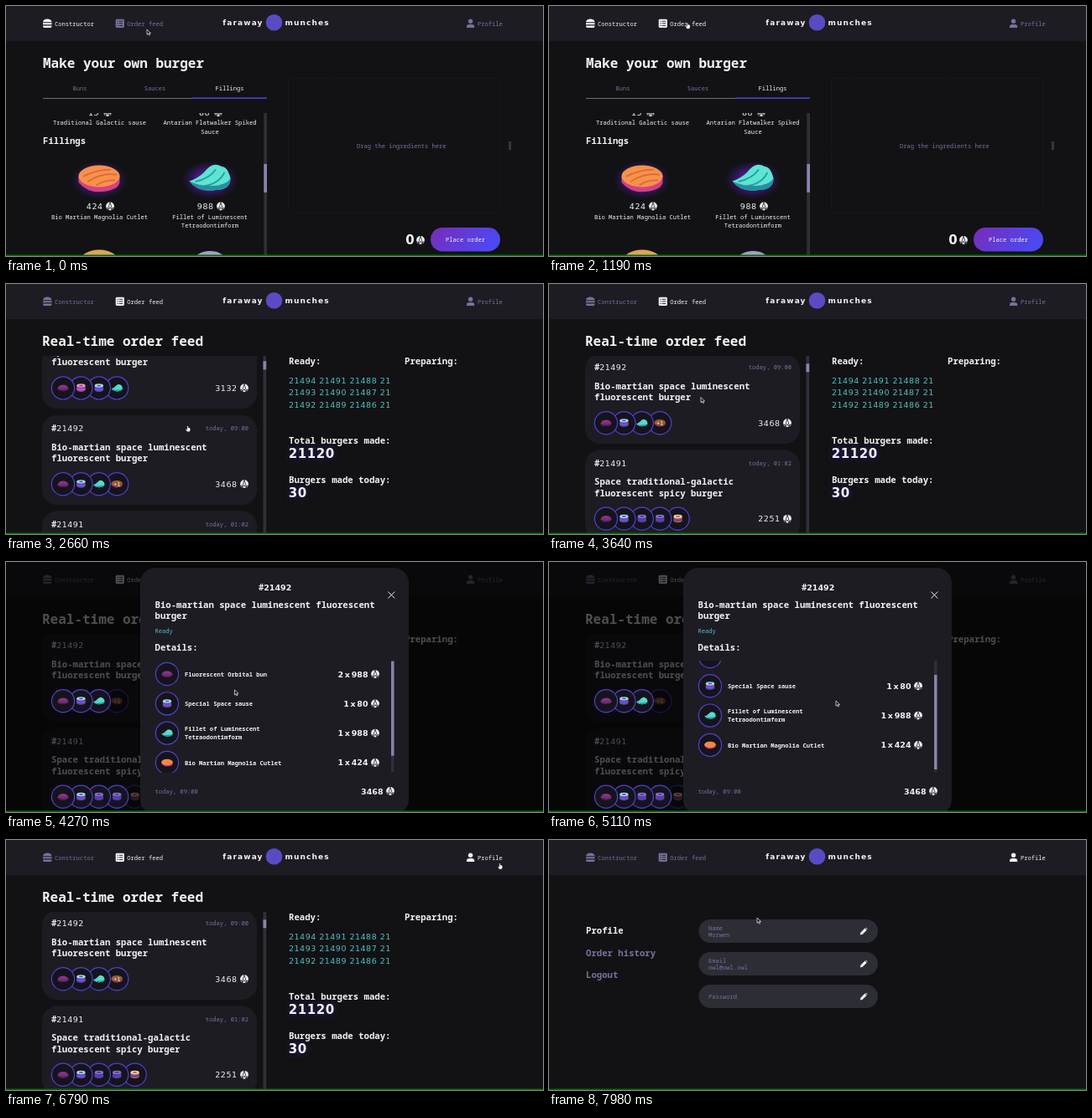
An HTML page that plays this animation: 640x299 px, repeating every 8000 ms.

```html
<!DOCTYPE html>
<html lang="en">
<head>
<meta charset="utf-8">
<title>Burger orders</title>
<style>
  html, body { margin: 0; width: 100%; height: 100%; overflow: hidden; background: #121214; }
  svg { display: block; width: 100vw; height: 100vh; }
  text { font-family: "Noto Sans Mono", "DejaVu Sans Mono", monospace; font-size: 7.11px; fill: #f2f2f3; white-space: pre; }
  .h1 { font-size: 16px; font-weight: bold; }
  .h2 { font-size: 10.67px; font-weight: bold; }
  .strong { font-weight: bold; }
  .num { font-family: "DejaVu Sans", Verdana, sans-serif; font-size: 9.5px; letter-spacing: .5px; }
  #modal .num { font-weight: bold; letter-spacing: 0; }
  .big { font-size: 15px; font-weight: bold; letter-spacing: .6px; }
  .brand { font-family: "DejaVu Sans", Verdana, sans-serif; font-size: 9px; font-weight: bold; letter-spacing: 1.1px; }
  .dim { fill: #74739a; }
  .cyan { fill: #4fc0c4; }
  .mid { text-anchor: middle; }
  .end { text-anchor: end; }
  .glow { filter: drop-shadow(0 0 4px #2a1a7a); }
</style>
</head>
<body>
<svg id="stage" viewBox="0 0 640 299" preserveAspectRatio="none"></svg>
<script>
const LOOP = 8000, STEP = 70;
const WHITE = '#f2f2f3', DIM = '#74739a', PANEL = '#1d1c23', BACK = '#121214';

const text = (x, y, s, cls = '') => `<text x="${x}" y="${y}" class="${cls}">${s}</text>`;
const rect = (x, y, w, h, fill, r = 0, more = '') =>
  `<rect x="${x}" y="${y}" width="${w}" height="${h}" rx="${r}" fill="${fill}" ${more}/>`;
const path = (d, fill, more = '') => `<path d="${d}" fill="${fill}" ${more}/>`;
const at = (x, y, s, scale = 1) => `<g transform="translate(${x} ${y}) scale(${scale})">${s}</g>`;
const clip = (id, x, y, w, h) => `<clipPath id="${id}">${rect(x, y, w, h, '#000')}</clipPath>`;
const lines = (x, y, gap, list, cls) => list.map((s, i) => text(x, y + i * gap, s, cls)).join('');
const orderNo = (x, y, n) => text(x, y, '#', 'h2') + text(x + 6.2, y, n, 'num');

const coin = (x, y) => at(x, y,
  `<circle r="4.9" fill="${WHITE}"/>` +
  path('M0-4.9L-2.8 4.4M0-4.9L2.8 4.4M-4.7 1.6L-2 3M4.7 1.6L2 3M-2.3 4.8L0 1.3L2.3 4.8', 'none',
    `stroke="${PANEL}" stroke-width=".8"`));

const price = (right, y, s) => text(right + .5, y + 3.5, s, 'num end') + coin(right + 9, y);

// Ingredients, drawn around their centre at thumbnail size.
function can(body, band, lid) {
  return path('M-5.4-3V3.2Q0 6.4 5.4 3.2V-3Z', body) + path('M-5.4-.2Q0 2.3 5.4-.2V2Q0 4.4-5.4 2Z', band) +
    `<ellipse cy="-3" rx="5.4" ry="2.3" fill="${lid}"/><ellipse cy="-3" rx="2.6" ry=".9" fill="${body}"/>`;
}
const foods = {
  bun: path('M-7 1Q-6-4 0-4Q6-4 7 1Q5 4 0 4Q-5 4-7 1Z', '#7d2c7c') +
    path('M-7 1Q0 4 7 1Q5 4 0 4Q-5 4-7 1Z', '#4b1c58') +
    path('M-4-1.5Q0-3.5 4-1.5', 'none', 'stroke="#a1489a" stroke-width=".8"'),
  blue: can('#5150b8', '#8c49c9', '#a9dbe8'),
  pink: can('#8d3bb3', '#d95aa5', '#e59ac2'),
  violet: can('#4a3a9c', '#6d3db5', '#8176c9'),
  cream: can('#a85f5b', '#6d3c9a', '#f2cfae'),
  fillet: path('M-7 1Q-4 0-2-2Q1-6 4-4Q6-4 7 0Q7 4 2 4Q-4 5-7 1Z', '#5fe3d3') +
    path('M-5 1.2Q0 0 2-3M-2 2.7Q3 2 5-2', 'none', 'stroke="#1f9d9c" stroke-width=".5"') +
    path('M-7 1Q-4 5 2 4Q7 4 7 0Q6 2 2 2.5Q-3 3-7 1Z', '#278f9d'),
  cutlet: path('M-7-.5V1.4Q-4 5 1 4.6Q7 4 7 1V-1Z', '#d63f86') +
    `<ellipse cy="-.7" rx="7" ry="3.7" fill="#f7914b"/>` +
    path('M-5.5-.6Q-1-3 4-3M-4 1.2Q1-2 6-1.2M-1 2.4Q2 .5 5.4.7', 'none', 'stroke="#d96a35" stroke-width=".5"')
};
const badge = (x, y, kind, extra) =>
  `<circle cx="${x}" cy="${y}" r="13.6" fill="#15141c" stroke="#5140d0" stroke-width="1.2"/>` +
  `<g opacity="${extra ? .6 : 1}">${at(x, y, foods[kind], .95)}</g>` +
  (extra ? text(x, y + 2.6, extra, 'mid') : '');

// The last badge of a row lies below the modal shade, the others above it.
function card(y, no, date, title, kinds, sum, extra) {
  const h = title.length > 1 ? 107 : 95, mid = y + h - 24.8, last = kinds.length - 1;
  const row = kinds.map((k, i) => badge(68 + 21.4 * i, mid, k, i === last && extra));
  return {
    base: rect(43, y, 256, h, PANEL, 18) + orderNo(54, y + 19, no) +
      text(289, y + 18.2, date, 'dim end') + lines(54, y + 41.7, 13.5, title, 'h2') +
      row[last] + price(275, mid, sum),
    lit: row.slice(0, last).reverse().join('')
  };
}

const cards = [
  card(86, 21494, 'today, 12:28', ['Space luminescent fluorescent burger'], ['bun', 'fillet', 'blue'], 3044),
  card(188.2, 21493, 'today, 12:26', ['Space antarian luminescent', 'fluorescent burger'],
    ['bun', 'pink', 'blue', 'fillet'], 3132),
  card(303, 21492, 'today, 09:00', ['Bio-martian space luminescent', 'fluorescent burger'],
    ['bun', 'blue', 'fillet', 'cutlet'], 3468, '+1'),
  card(417.6, 21491, 'today, 01:02', ['Space traditional-galactic', 'fluorescent spicy burger'],
    ['bun', 'blue', 'violet', 'violet', 'cream'], 2251)
];
const cardLayer = (id, part) =>
  `<g clip-path="url(#feedBox)"><g id="${id}">${cards.map(c => c[part]).join('')}</g></g>`;

const tab = (x, s, on) => text(x, 101, s, 'mid' + (on ? '' : ' dim'));
const glowSpot = (x, y) => `<ellipse cx="${x}" cy="${y}" rx="34" ry="23" fill="url(#aura)"/>`;

function buildConstructor() {
  const list =
    text(98, 131, '15', 'num') + coin(121, 127) + text(230, 131, '88', 'num') + coin(253, 127) +
    text(111.5, 142, 'Traditional Galactic sause', 'mid') +
    lines(243, 142, 10.6, ['Antarian Flatwalker Spiked', 'Sauce'], 'mid') +
    text(44, 165, 'Fillings', 'h2') +
    glowSpot(111, 208) + glowSpot(243, 208) +
    at(111, 206, foods.cutlet, 3.5) + at(243, 206, foods.fillet, 3.5) +
    price(115, 239.5, '424') + price(247, 239.5, '988') +
    text(111.5, 254.5, 'Bio Martian Magnolia Cutlet', 'mid') +
    lines(243, 254.5, 10.4, ['Fillet of Luminescent', 'Tetraodontimform'], 'mid') +
    `<ellipse cx="111" cy="304" rx="22" ry="12.5" fill="#dfa35c"/>` +
    `<ellipse cx="243" cy="305" rx="19" ry="12" fill="#a99bc4"/>`;
  return text(44, 74, 'Make your own burger', 'h1') +
    tab(88, 'Buns') + tab(177.5, 'Sauces') + tab(266.5, 'Fillings', true) +
    rect(44, 110, 178, .8, '#85848f') + rect(222, 109.5, 89, 1.4, '#4c4cf0') +
    `<g clip-path="url(#shelf)">${list}</g>` +
    rect(307.3, 128, 3.7, 170, '#2f2f37') + rect(307.3, 189, 3.7, 34, '#8585ad') +
    rect(336.5, 86.5, 252, 161, 'none', 3, 'stroke="#1b1b20" stroke-dasharray="2 1"') +
    text(471.3, 170, 'Drag the ingredients here', 'dim mid') +
    rect(599, 162, 3, 10, '#35353d') +
    text(476.2, 285, '0', 'num big') + coin(494, 280) +
    rect(506, 265, 83, 28.5, 'url(#button)', 14.2) + text(547.5, 282, 'Place order', 'mid');
}

function buildFeed() {
  const ready = [0, 1, 2].map(r => [94, 91, 88].map(n => 21400 + n - r).join(' ') + ' 21');
  return text(43, 74, 'Real-time order feed', 'h1') + cardLayer('cards', 'base') +
    rect(306.5, 86, 3.7, 212, '#2f2f37') + `<g id="feedThumb">${rect(306.5, 86.3, 3.7, 10, '#8585ad')}</g>` +
    text(337, 96.4, 'Ready:', 'h2') + text(475, 96.4, 'Preparing:', 'h2') +
    lines(337, 119.1, 14.2, ready, 'num cyan') +
    text(337, 191.2, 'Total burgers made:', 'h2') + text(336.7, 207.6, '21120', 'num big glow') +
    text(337, 238.2, 'Burgers made today:', 'h2') + text(336.7, 254.6, '30', 'num big glow');
}

function buildModal() {
  const rows = [
    ['bun', ['Fluorescent Orbital bun'], '2 x 988'],
    ['blue', ['Special Space sause'], '1 x 80'],
    ['fillet', ['Fillet of Luminescent', 'Tetraodontimform'], '1 x 988'],
    ['cutlet', ['Bio Martian Magnolia Cutlet'], '1 x 424']
  ].map(([kind, name, sum], i) => {
    const y = 135 + 35.3 * i;
    return badge(192, y, kind) + lines(213, y + (name.length > 1 ? -2.8 : 2.6), 10.5, name, 'strong') +
      `<g style="word-spacing:-1.6px">${price(431, y, sum)}</g>`;
  }).join('');
  return rect(160, 7, 320, 295, PANEL, 18) + orderNo(301, 34, 21492) +
    path('M455.3 35.5L463.3 43.5M463.3 35.5L455.3 43.5', 'none', `stroke="${WHITE}" stroke-width="1"`) +
    lines(177.5, 54.5, 13.4, ['Bio-martian space luminescent fluorescent', 'burger'], 'h2') +
    text(177.5, 84.5, 'Ready', 'cyan') + text(177.5, 106, 'Details:', 'h2') +
    `<g clip-path="url(#modalBox)"><g id="rows">${rows}</g></g>` +
    rect(459, 118, 3.5, 133, '#2f2f37') + `<g id="modalThumb">${rect(459, 118, 3.5, 113, '#8585ad')}</g>` +
    text(177.5, 276.5, 'today, 09:00', 'dim') + price(449, 274, '3468');
}

function buildProfile() {
  const pencil = path('M-4.2 4.2L-3.5 1.3L1.5-3.7L3.7-1.5L-1.3 3.5ZM2.2-4.3L3-4.5L4.5-3L4.3-2.2Z', WHITE);
  const field = (y, label, value) => rect(178.5, y, 213.5, 28, '#2c2d35', 14) + at(375, y + 14.3, pencil) +
    lines(190, y + (value ? 12.6 : 16.6), 8, value ? [label, value] : [label], 'dim');
  return text(44, 112, 'Profile', 'h2') + text(44, 138.5, 'Order history', 'h2 dim') +
    text(44, 165, 'Logout', 'h2 dim') +
    field(95, 'Name', 'Morwen') + field(134, 'Email', 'owl@owl.owl') + field(173, 'Password');
}

function buildHeader() {
  const shape = d => `<path d="${d}"/>`;
  const burger = shape('M44 19.2Q44.6 15.6 49.3 15.6Q54 15.6 54.6 19.2ZM44 20.3H54.6V22.3H44ZM44 23.4H54.6Q54.6 26 52 26H46.6Q44 26 44 23.4Z');
  const sheet = `<rect x="130.7" y="15.8" width="10.2" height="10.2" rx="1.4"/>` +
    path('M132.4 18.3h1.2m1 0h4.6M132.4 20.9h1.2m1 0h4.6M132.4 23.5h1.2m1 0h4.6', 'none', `stroke="${PANEL}" stroke-width=".9"`);
  const person = `<circle cx="553.6" cy="18.3" r="2.7"/>` + shape('M549 26V24.6Q549 22 552 22H555.2Q558.2 22 558.2 24.6V26Z');
  const link = (id, x, label, icon) =>
    `<g id="${id}">${icon}<text x="${x}" y="23.5" style="fill:inherit">${label}</text></g>`;
  return rect(0, 0, 640, 42, PANEL) +
    link('navMake', 58, 'Constructor', burger) + link('navFeed', 144.3, 'Order feed', sheet) +
    link('navUser', 562, 'Profile', person) +
    text(306.5, 22.8, 'faraway', 'brand end') + `<circle cx="319.5" cy="19.8" r="9.8" fill="#5a4bc4"/>` +
    text(332.5, 22.8, 'munches', 'brand');
}

const arrow = path('M0 0V8.3L2 6.5L3.3 9.4L4.7 8.8L3.4 6H6Z', '#111', 'stroke="#fff" stroke-width=".9"');
const hand = path('M-.9.5Q0-.6.9.5V3Q2 2.4 2.5 3.3Q4.3 3 4.3 4.5V6.5Q4 8.7 2.8 9.6H-.8Q-2 8.2-3.2 5.6Q-2.4 4.4-.9 5.9Z',
  '#fff', 'stroke="#111" stroke-width=".6"');

const stage = document.getElementById('stage');
stage.innerHTML = `<defs>
  ${clip('shelf', 40, 128, 266, 170)}${clip('feedBox', 43, 86, 257, 212)}${clip('modalBox', 170, 118, 285, 134)}
  <linearGradient id="button" x1="0" y1="0" x2="1" y2=".3"><stop stop-color="#7a2bb8"/><stop offset="1" stop-color="#4d48f2"/></linearGradient>
  <radialGradient id="aura"><stop offset=".4" stop-color="#5b1fb0" stop-opacity=".8"/><stop offset="1" stop-color="#3a1a80" stop-opacity="0"/></radialGradient>
  </defs>` + rect(0, 0, 640, 299, BACK) + buildHeader() +
  `<g id="make">${buildConstructor()}</g><g id="feed">${buildFeed()}</g><g id="user">${buildProfile()}</g>` +
  `<g id="shade">${rect(0, 0, 640, 298, '#000', 0, 'opacity=".68"')}</g>` +
  `<g id="lit">${cardLayer('badges', 'lit')}</g>` +
  `<g id="modal">${buildModal()}</g>` + rect(0, 297.5, 640, 1.5, '#066a0a') +
  `<g id="cursor"><g id="arrow">${at(0, 0, arrow, .75)}</g><g id="hand">${at(0, 0, hand, .75)}</g></g>`;

const $ = id => document.getElementById(id);
const show = (id, on) => $(id).setAttribute('display', on ? 'inline' : 'none');
const move = (id, x, y) => $(id).setAttribute('transform', `translate(${x} ${y})`);
const tint = (id, on) => $(id).setAttribute('fill', on ? WHITE : DIM);
const within = (t, a, b) => t >= a && t < b;

// Eased value of keys [time, value, value...] at time t.
function track(keys, t) {
  const i = keys.findIndex(k => k[0] > t);
  if (i === 0) return keys[0].slice(1);
  if (i < 0) return keys[keys.length - 1].slice(1);
  const a = keys[i - 1], b = keys[i], u = (t - a[0]) / (b[0] - a[0]), e = u * u * (3 - 2 * u);
  return a.slice(1).map((v, j) => v + (b[j + 1] - v) * e);
}

const pointer = [[0, 168, 28], [420, 165, 20], [1400, 165, 20], [1890, 206.5, 142], [2660, 216.5, 169.5],
  [3080, 216.5, 169.5], [3570, 181, 135.5], [3850, 181, 135.5], [4620, 342, 166], [5530, 342, 166],
  [6160, 458, 37], [6370, 458, 37], [6720, 588.5, 27.7], [6860, 588.5, 27.7], [7000, 584, 20],
  [7700, 584, 20], [7980, 248, 93]];
const feedScroll = [[1960, 0], [2660, 146], [2800, 146], [3150, 219]];
const rowScroll = [[4200, 0], [4760, 22]];

const toFeed = 1400, openAt = 3710, closeAt = 6370, toUser = 7140;

function draw(t) {
  const onMake = t < toFeed, onFeed = within(t, toFeed, toUser), open = within(t, openAt, closeAt);
  show('make', onMake);
  show('feed', onFeed);
  show('lit', onFeed);
  show('user', t >= toUser);
  show('shade', open);
  show('modal', open);
  tint('navMake', onMake);
  tint('navFeed', within(t, 70, toUser));
  tint('navUser', t >= 6650);

  const [y] = track(feedScroll, t), [r] = track(rowScroll, t);
  move('cards', 0, -y);
  move('badges', 0, -y);
  move('feedThumb', 0, y * 9 / 219);
  move('rows', 0, -r);
  move('modalThumb', 0, r * 17 / 22);

  const pointing = within(t, 140, 3150) || within(t, 6090, closeAt) || within(t, 6650, 7840);
  show('hand', pointing);
  show('arrow', !pointing);
  move('cursor', ...track(pointer, t));
}

const start = performance.now();
function tick() {
  const t = (performance.now() - start) % LOOP;
  draw(Math.floor(t / STEP) * STEP);
  requestAnimationFrame(tick);
}
draw(0);
tick();
</script>
</body>
</html>
```
